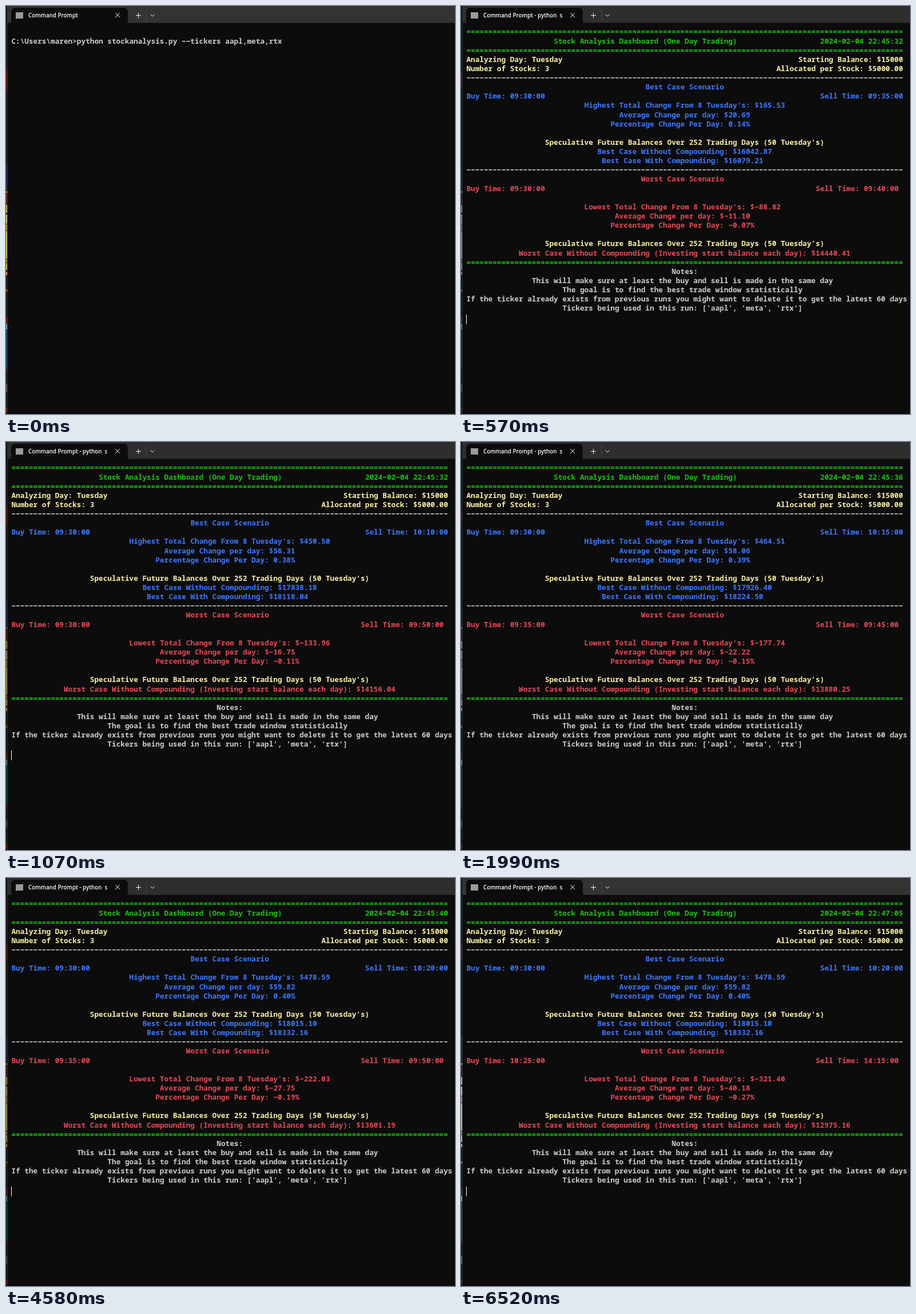
Animation, 785 px wide and 714 px high, one loop 6590 ms. Source, as an HTML page with a canvas:

```html
<!DOCTYPE html>
<html lang="en">
<head>
<meta charset="utf-8">
<title>Stock analysis terminal</title>
<style>
  html, body { margin: 0; width: 100%; height: 100%; overflow: hidden; background: #0c0c0c; }
  canvas { display: block; }
</style>
</head>
<body>
<canvas id="stage" width="785" height="714"></canvas>
<script>
const ctx = document.getElementById('stage').getContext('2d');
const LOOP = 6590, TICK = 70.1;
const CELL = 7.635, ROW = 16.13, LEFT = 9.4, BASE = 49.4;
const START = 15000, DAYS = 252 / 5;
const GREEN = '#16c60c', YELLOW = '#f9f1a5', BLUE = '#3b78ff', RED = '#e74856', GREY = '#cccccc';
const DASHBOARD_TICK = 4, REFOCUS_TICK = 81;

// [tick, clock, best sell, best balance, worst buy, worst sell, worst balance]
const states = [
  [4, '22:45:32', '09:35', 16042.87, '09:30', '09:40', 14440.41],
  [12, '22:45:32', '10:10', 17838.18, '09:30', '09:50', 14156.04],
  [22, '22:45:36', '10:15', 17926.40, '09:35', '09:45', 13880.25],
  [32, '22:45:40', '10:20', 18015.10, '09:35', '09:50', 13601.19],
  [82, '22:46:48', '10:20', 18015.10, '10:15', '12:45', 13419.46],
  [88, '22:46:53', '10:20', 18015.10, '10:15', '13:10', 13310.32],
  [91, '22:46:58', '10:20', 18015.10, '10:20', '13:35', 13207.18],
  [92, '22:47:02', '10:20', 18015.10, '10:20', '13:55', 13090.44],
  [93, '22:47:05', '10:20', 18015.10, '10:25', '14:15', 12975.16],
];

// Desktop sliver left of the window: [top, bottom, colour]
const sliver = [
  [0, 714, '#16151a'], [113, 146, '#5e1510'], [278, 322, '#27204f'], [324, 327, '#b09a50'],
  [328, 346, '#5c1a12'], [348, 362, '#b8a83c'], [365, 381, '#c0b468'], [382, 393, '#b88436'],
  [394, 442, '#c0bb45'], [443, 449, '#a47a30'], [450, 462, '#b9b04c'], [465, 471, '#c19a38'],
  [496, 500, '#9a6530'], [545, 555, '#681a18'], [556, 566, '#48a9ae'], [567, 634, '#0c4954'],
  [635, 640, '#402020'], [661, 675, '#55504e'], [703, 710, '#701810'],
];

function rect(x, y, w, h, color) {
  ctx.fillStyle = color;
  ctx.fillRect(x, y, w, h);
}

function stroke(color, ...lines) {
  ctx.strokeStyle = color;
  ctx.lineWidth = 1;
  ctx.beginPath();
  for (const [start, ...rest] of lines) {
    ctx.moveTo(...start);
    rest.forEach(p => ctx.lineTo(...p));
  }
  ctx.stroke();
}

function print(row, col, text, color) {
  ctx.font = `600 ${CELL / 0.6}px "Noto Sans Mono", "DejaVu Sans Mono", monospace`;
  ctx.fillStyle = color;
  // The minus glyph has the wide dash of a terminal face.
  ctx.fillText(text.replace(/-/g, '\u2212'), LEFT + col * CELL, BASE + row * ROW);
}

function printRight(row, end, text, color) {
  print(row, end - text.length, text, color);
}

function cursor(row, col) {
  rect(Math.round(LEFT + col * CELL), Math.round(39.5 + row * ROW), 1, 17, '#ffffff');
}

function drawWindow(running, focused) {
  rect(0, 0, 785, 714, '#0c0c0c');
  for (const [top, bottom, color] of sliver) rect(0, top, 2, bottom - top, color);
  rect(0, 0, 2, 714, `rgba(0,0,0,${focused ? 0 : 0.3})`);
  rect(2, 0, 1, 714, '#2c2b38');
  rect(2, 0, 783, 29.5, focused ? '#333333' : '#2e2e2e');

  ctx.fillStyle = '#0c0c0c';
  ctx.beginPath();
  ctx.roundRect(9, 3, 204, 27, [7, 7, 0, 0]);
  ctx.fill();

  rect(17, 11, 13, 11, '#9a9a9a');
  ctx.font = '600 9.8px "Open Sans", "Noto Sans", sans-serif';
  ctx.fillStyle = '#ffffff';
  ctx.save();
  ctx.beginPath();
  ctx.rect(36, 4, 143, 24);
  ctx.clip();
  ctx.fillText(running ? 'Command Prompt - python  s' : 'Command Prompt', 39, 20.3);
  ctx.restore();

  stroke('#f0f0f0',
    [[191, 12], [199, 20]], [[199, 12], [191, 20]],
    [[227, 16.5], [236, 16.5]], [[231.5, 12], [231.5, 21]],
    [[252.5, 14.5], [256, 18], [259.5, 14.5]]);
  stroke('#484848', [[245.5, 6], [245.5, 27]]);
}

function printResults(row, kind, balance, color, avgCol) {
  const avg = (balance - START) / DAYS;
  print(row, 27, `${kind} Total Change From 8 Tuesday's: $${(avg * 8).toFixed(2)}`, color);
  print(row + 1, avgCol, `Average Change per day: $${avg.toFixed(2)}`, color);
  print(row + 2, 33, `Percentage Change Per Day: ${(avg / START * 100).toFixed(2)}%`, color);
  print(row + 4, 18, "Speculative Future Balances Over 252 Trading Days (50 Tuesday's)", YELLOW);
  return avg;
}

function drawDashboard([, clock, bestSell, best, worstBuy, worstSell, worst]) {
  for (const row of [0, 2, 25]) print(row, 0, '='.repeat(100), GREEN);
  for (const row of [5, 15]) print(row, 0, '-'.repeat(100), GREY);

  print(1, 20, 'Stock Analysis Dashboard (One Day Trading)', GREEN);
  printRight(1, 100, `2024-02-04 ${clock}`, GREEN);
  print(3, 0, 'Analyzing Day: Tuesday', YELLOW);
  printRight(3, 100, 'Starting Balance: $15000', YELLOW);
  print(4, 0, 'Number of Stocks: 3', YELLOW);
  printRight(4, 100, 'Allocated per Stock: $5000.00', YELLOW);

  print(6, 41, 'Best Case Scenario', BLUE);
  print(7, 0, 'Buy Time: 09:30:00', BLUE);
  printRight(7, 100, `Sell Time: ${bestSell}:00`, BLUE);
  const gain = printResults(8, 'Highest', best, BLUE, 35);
  const compounded = START * (1 + gain / START) ** DAYS;
  print(13, 30, `Best Case Without Compounding: $${best.toFixed(2)}`, BLUE);
  print(14, 31, `Best Case With Compounding: $${compounded.toFixed(2)}`, BLUE);

  print(16, 40, 'Worst Case Scenario', RED);
  print(17, 0, `Buy Time: ${worstBuy}:00`, RED);
  printRight(17, 99, `Sell Time: ${worstSell}:00`, RED);
  printResults(19, 'Lowest', worst, RED, 34);
  print(24, 12, `Worst Case Without Compounding (Investing start balance each day): $${worst.toFixed(2)}`, RED);

  print(26, 47, 'Notes:', GREY);
  print(27, 15, 'This will make sure at least the buy and sell is made in the same day', GREY);
  print(28, 22, 'The goal is to find the best trade window statistically', GREY);
  print(29, 0, 'If the ticker already exists from previous runs you might want to delete it to get the latest 60 days', GREY);
  print(30, 22, "Tickers being used in this run: ['aapl', 'meta', 'rtx']", GREY);
}

function cursorVisible(tick) {
  if (tick >= 89) return true;
  const flipped = tick >= DASHBOARD_TICK && tick < 12;
  return (tick % 2 === 1) !== flipped;
}

function draw(time) {
  const tick = Math.floor((time % LOOP) / TICK + 0.1);
  const running = tick >= DASHBOARD_TICK;
  drawWindow(running, !running || tick >= REFOCUS_TICK);
  if (running) {
    drawDashboard(states.findLast(s => s[0] <= tick));
    if (cursorVisible(tick)) cursor(31, 0);
  } else {
    const command = 'C:\\Users\\maren>python stockanalysis.py --tickers aapl,meta,rtx';
    print(1, 0, command, GREY);
    if (cursorVisible(tick)) cursor(1, command.length);
  }
}

const begin = performance.now();
function frame() {
  draw(performance.now() - begin);
  requestAnimationFrame(frame);
}
frame();
</script>
</body>
</html>
```
